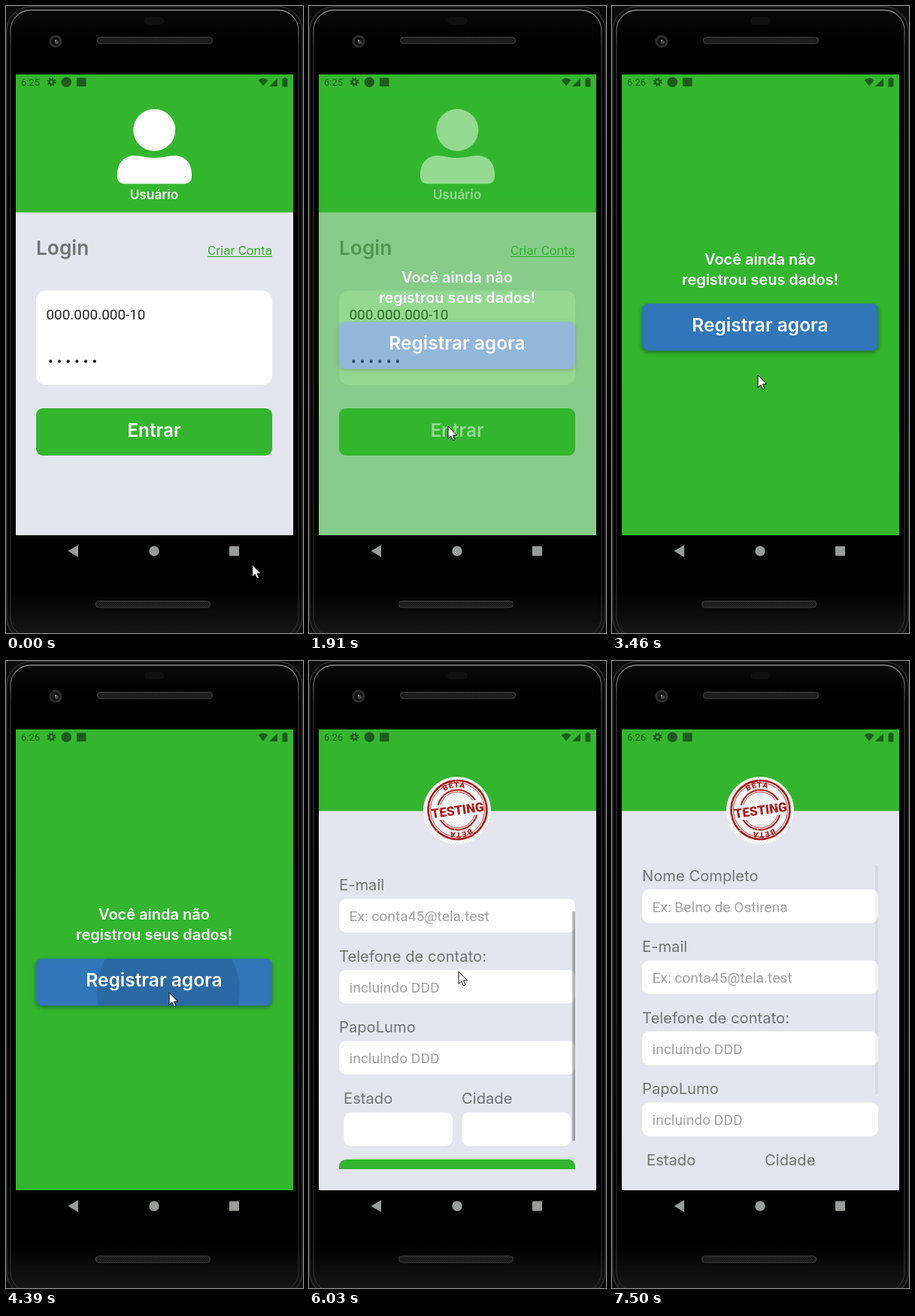
These frames come from a looping animation (395x834 px, 7970 ms). An HTML page:

```html
<!DOCTYPE html>
<html lang="pt">
<head>
<meta charset="utf-8">
<title>Fluxo de cadastro</title>
<style>
  html, body { margin: 0; width: 100%; height: 100%; overflow: hidden; background: #000; }
  svg { display: block; width: 100%; height: 100%; }
  .ui { font-family: Poppins, Inter, sans-serif; }
  .bold { font-weight: 600; fill: #fff; text-anchor: middle; }
  .label { font-size: 20.2px; fill: #737373; }
  .sys { font-family: Roboto, sans-serif; }
  .hint { font-size: 19.2px; fill: #a2a2a2; }
  .stamp { font-family: Roboto, sans-serif; font-weight: 900; fill: #ac1a1a; }
</style>
</head>
<body>
<svg viewBox="0 0 395 834">
  <defs>
    <linearGradient id="bodyFill" x1="0" y1="0" x2="0" y2="1">
      <stop offset="0" stop-color="#090909"/>
      <stop offset=".06" stop-color="#000"/>
      <stop offset=".92" stop-color="#000"/>
      <stop offset="1" stop-color="#1a1a1a"/>
    </linearGradient>
    <linearGradient id="rim" x1="0" y1="0" x2="0" y2="1">
      <stop offset="0" stop-color="#8a8a8a"/>
      <stop offset=".06" stop-color="#3c3c3c"/>
      <stop offset="1" stop-color="#2c2c2c"/>
    </linearGradient>
    <pattern id="mesh" width="3" height="3" patternUnits="userSpaceOnUse">
      <rect width="3" height="3" fill="#262626"/>
      <path d="M0 0L3 3M3 0L0 3" stroke="#111" stroke-width=".8"/>
    </pattern>
    <pattern id="checker" width="4" height="4" patternUnits="userSpaceOnUse">
      <rect width="4" height="4" fill="#fafafa"/>
      <path d="M0 0h2v2h-2zM2 2h2v2h-2z" fill="#efefef"/>
    </pattern>
    <clipPath id="screen"><rect x="13" y="91" width="369" height="613"/></clipPath>
    <clipPath id="list"><rect x="40" y="271.5" width="314" height="404.5"/></clipPath>
    <clipPath id="blueBox"><rect x="40" y="396" width="314" height="62.5" rx="8"/></clipPath>
    <path id="arc" d="M-30 0A30 30 0 0 1 30 0"/>
  </defs>

  <!-- phone -->
  <rect width="395" height="834" fill="#0b0b0b"/>
  <rect x="1" y="1" width="393" height="844" rx="32" fill="url(#bodyFill)" stroke="#303030" stroke-width="1.5"/>
  <rect x="6" y="5.5" width="383" height="834" rx="27" fill="none" stroke="url(#rim)" stroke-width="1.3"/>
  <rect x="184" y="14.5" width="27" height="10" rx="5" fill="#111"/>
  <circle cx="66" cy="47" r="8.5" fill="#2d2d2d"/>
  <circle cx="66" cy="47" r="5.5" fill="#101010"/>
  <circle cx="67.5" cy="48" r="2.6" fill="#4a4a4a"/>
  <circle cx="66" cy="46" r="1" fill="#aaa"/>
  <g fill="url(#mesh)" stroke="#424242">
    <rect x="121.5" y="41.5" width="153" height="8.5" rx="4"/>
    <rect x="119.5" y="791.5" width="152" height="8.5" rx="4"/>
  </g>
  <g fill="#999d99">
    <path d="M82.500 725L96 717V733Z"/>
    <circle cx="197" cy="725" r="6.700"/>
    <rect x="297" y="718.500" width="13" height="13" rx="1"/>
  </g>

  <g clip-path="url(#screen)">
    <!-- login -->
    <g id="login" class="ui">
      <rect x="13" y="91" width="369" height="613" fill="#e5e5ef"/>
      <rect x="13" y="91" width="369" height="183.500" fill="#33b62e"/>
      <circle cx="197.300" cy="165" r="28" fill="#fff"/>
      <path d="M148 224C148 208 158 199 171 199C181 199 184 202 197.500 202S214 199 224 199C237 199 247 208 247 224V227C247 233 243 236.500 237 236.500H158C152 236.500 148 233 148 227Z" fill="#fff"/>
      <text class="bold" x="197" y="257" font-size="17.300">Usuário</text>
      <text x="40" y="331" font-size="26.300" font-weight="600" fill="#737373">Login</text>
      <text class="sys" x="268" y="331" font-size="17.200" fill="#33b62e">Criar Conta</text>
      <path d="M268 333.300H354" stroke="#33b62e" stroke-width="1.200"/>
      <rect x="40" y="378.500" width="314" height="125.500" rx="13" fill="#fff"/>
      <text class="sys" x="53.500" y="417" font-size="18.900" fill="#222">000.000.000-10</text>
      <g id="dots" fill="#1c1c1c"></g>
      <g id="enter">
        <rect x="40" y="535" width="314" height="63" rx="9" fill="#33b62e"/>
        <text class="bold" x="197" y="573" font-size="24.300">Entrar</text>
      </g>
    </g>

    <!-- notice -->
    <g id="notice" class="ui">
      <rect x="13" y="91" width="369" height="675" fill="#33b62e"/>
      <text class="bold" x="197" y="343.500" font-size="20">Você ainda não</text>
      <text class="bold" x="197" y="370.500" font-size="19.900">registrou seus dados!</text>
      <rect x="40" y="396" width="314" height="62.500" rx="8" fill="#3076b8" style="filter:drop-shadow(0 2px 3px rgba(0,0,0,.4))"/>
      <g clip-path="url(#blueBox)"><circle id="ripple" cx="216" cy="440"/></g>
      <text class="bold" x="197" y="433" font-size="24.500">Registrar agora</text>
    </g>

    <!-- form -->
    <g id="form" class="ui">
      <rect x="13" y="91" width="369" height="675" fill="#e5e5ef"/>
      <rect x="13" y="41" width="369" height="158.500" fill="#33b62e"/>
      <circle cx="197" cy="199" r="45" fill="url(#checker)"/>
      <g transform="translate(197.500 198) rotate(-8)">
        <g fill="none" stroke="#ac1a1a">
          <circle r="39" stroke-width="2.600"/>
          <circle r="36" stroke-width=".8"/>
          <circle r="26.500" stroke-width="2"/>
          <circle r="23.800" stroke-width=".8"/>
        </g>
        <g id="betas" class="stamp" font-size="10" letter-spacing="1" text-anchor="middle">
          <text><textPath href="#arc" startOffset="50%">BETA</textPath></text>
          <text transform="rotate(180)"><textPath href="#arc" startOffset="50%">BETA</textPath></text>
        </g>
        <rect x="-34" y="-9.500" width="68" height="19.500" fill="#f6f6f6"/>
        <text class="stamp" y="6.500" font-size="17" text-anchor="middle">TESTING</text>
        <g id="specks" fill="#f8f4f4"></g>
      </g>
      <g clip-path="url(#list)">
        <g id="rows"></g>
        <rect id="bar" x="350.300" width="3.700" height="305"/>
      </g>
    </g>

    <!-- status bar -->
    <rect id="shade" x="13" y="91" width="369" height="20"/>
    <g fill="#1d5a1b">
      <text id="clock" class="sys" x="20" y="106.300" font-size="13"></text>
      <g fill="none" stroke="#1d5a1b" stroke-width="2.400">
        <circle cx="60.500" cy="101" r="3.100"/>
        <circle cx="60.500" cy="101" r="4.800" stroke-dasharray="1.885"/>
      </g>
      <circle cx="80.300" cy="101.300" r="6.700"/>
      <rect x="94" y="95.500" width="12.500" height="11.500"/>
      <path d="M335.500 98.500Q342 93.500 348.500 98.500L342 106.500Z"/>
      <path d="M350 107H361V96Z"/>
      <path d="M367.500 96.500H369.500V95H372.500V96.500H374.500V107.500H367.500Z"/>
    </g>
  </g>

  <path id="cursor" d="M0 0V16.500L3.800 13L6.400 18.800L9 17.600L6.500 12H11.600Z" fill="#fff" stroke="#000" stroke-width="1"/>
</svg>
<script>
const LOOP = 7970;
const $ = id => document.getElementById(id);
const set = (id, attrs) => {
  for (const name in attrs) $(id).setAttribute(name, attrs[name]);
};

// Bursts of change: first step, last step, number of steps
const bursts = [
  [70, 750, 10], [1060, 1360, 5], [1820, 2610, 11], [2690, 3460, 11], [3540, 3690, 3],
  [4390, 5170, 11], [5250, 5790, 8], [5940, 6730, 11], [6810, 7500, 10]
];

// Tracks of [time, values...]
const pointer = [
  [750, 191, 576], [1820, 191, 576], [2531, 137, 424], [2690, 92, 378], [2767, 78, 330],
  [2921, 150, 246], [3075, 245, 262], [3152, 290, 330], [3306, 262, 470], [3383, 220, 508],
  [3460, 194, 491], [3690, 217, 441], [4390, 217, 441], [4858, 217, 431], [5170, 170, 300],
  [5250, 150, 289], [5404, 125, 330], [5560, 130, 440], [5790, 174, 528], [5940, 182, 480],
  [6019, 199, 413], [6180, 212, 345], [6340, 216, 340], [6660, 222, 530], [7250, 240, 700],
  [7500, 255, 850]
];
const scroll = [[5790, 0], [5940, 30], [6019, 82], [6180, 132], [6340, 132], [6660, 4], [6850, 0]];
const barAlpha = [[4900, .3], [5170, 0], [5790, 0], [5940, .3], [7100, .3], [7500, .05]];
const press = [[985, 1], [1135, .3], [1210, .35], [1360, 1]];
const ripple = [[4390, 95, .11], [4546, 260, .11], [4700, 300, 0]];
const shade = [[4480, 0], [4620, .09], [5000, .09], [5170, 0]];

const clamp = v => Math.min(1, Math.max(0, v));
const easeOut = p => 1 - (1 - p) ** 2;
const easeBoth = p => p * p * (3 - 2 * p);

function at(track, t) {
  const i = track.findIndex(k => k[0] > t);
  if (i === 0) return track[0].slice(1);
  if (i < 0) return track[track.length - 1].slice(1);
  const a = track[i - 1], b = track[i], p = (t - a[0]) / (b[0] - a[0]);
  return a.slice(1).map((v, j) => v + (b[j + 1] - v) * p);
}

// Hold the picture between steps, as a screen recording does
function snap(t) {
  let held = 0;
  for (const [start, end, n] of bursts) {
    if (t < start) break;
    const step = (end - start) / (n - 1);
    held = start + Math.min(n - 1, Math.floor((t - start) / step + .01)) * step;
  }
  return held;
}

function build() {
  for (let i = 0; i < 6; i++) {
    $('dots').innerHTML += `<circle cx="${59.3 + i * 11.7}" cy="472.7" r="2.1"/>`;
  }

  const label = (x, y, s) => `<text class="label" x="${x}" y="${y}">${s}</text>`;
  const box = (x, y, w) => `<rect x="${x}" y="${y}" width="${w}" height="44.7" rx="9" fill="#fff"/>`;
  const fields = [
    ['Nome Completo', 'Ex: Belno de Ostirena'],
    ['E-mail', 'Ex: conta45@tela.test'],
    ['Telefone de contato:', 'incluindo DDD'],
    ['PapoLumo', 'incluindo DDD']
  ];
  let rows = fields.map(([name, hint], i) => {
    const y = 292.5 + i * 94.5;
    return label(40, y, name) + box(40, y + 11.3, 314) +
      `<text class="sys hint" x="53.5" y="${y + 41}">${hint}</text>`;
  }).join('');
  rows += label(46, 671, 'Estado') + box(46.5, 682.5, 144.5);
  rows += label(203, 671, 'Cidade') + box(203.5, 682.5, 144.5);
  rows += '<rect x="40" y="745" width="314" height="63" rx="9" fill="#33b62e"/>' +
    '<text class="bold" x="197" y="783" font-size="24.3">Registrar</text>';
  $('rows').innerHTML = rows;

  let seed = 7;
  const rand = () => (seed = seed * 16807 % 2147483647) / 2147483647;
  let specks = '';
  for (let i = 0; i < 60; i++) {
    const r = 40 * Math.sqrt(rand()), a = 6.283 * rand();
    specks += `<circle cx="${r * Math.cos(a)}" cy="${r * Math.sin(a)}" r="${.3 + rand() * .5}"/>`;
  }
  $('specks').innerHTML = specks;
}

// A page fades in while rising into place
function enterPage(id, t, start, length) {
  const p = easeOut(clamp((t - start) / length));
  set(id, { opacity: clamp(p * 1.03), transform: `translate(0 ${49 * (1 - p)})` });
}

function draw(time) {
  const t = snap(time);
  let [x, y] = at(pointer, t);
  if (t < 750) {
    const p = easeBoth(t / 750);
    x = 327.5 - 136.5 * p;
    y = 743 - 167 * p;
  }
  set('cursor', { transform: `translate(${x} ${y})` });

  set('enter', { opacity: at(press, t)[0] });
  enterPage('notice', t, 1780, 400);
  enterPage('form', t, 4520, 395);

  const [r, alpha] = at(ripple, t);
  set('ripple', { r, opacity: t < 4390 ? 0 : alpha });

  const s = at(scroll, t)[0];
  set('rows', { transform: `translate(0 ${-s})` });
  set('bar', { y: 271.5 + s * .753, opacity: at(barAlpha, t)[0] });

  set('shade', { opacity: at(shade, t)[0] });
  $('clock').textContent = t < 2100 ? '6:25' : '6:26';
}

build();
const begin = performance.now();
function tick() {
  draw((performance.now() - begin) % LOOP);
  requestAnimationFrame(tick);
}
tick();
</script>
</body>
</html>
```
